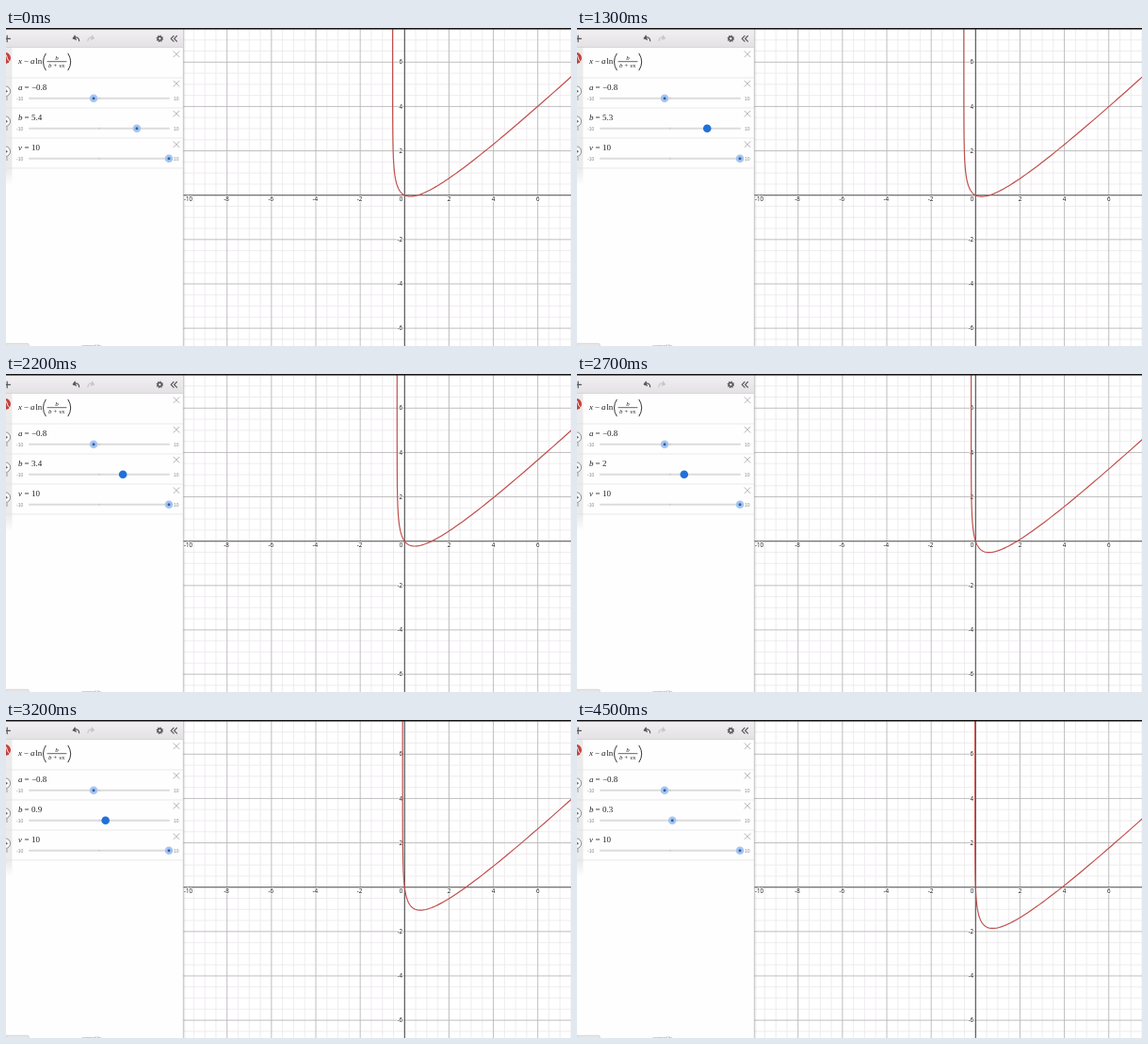
Write an HTML page that moves like this. It is 600 px wide and 338 px high and loops after 4.7 s.

```html
<!DOCTYPE html>
<html lang="en">
<head>
<meta charset="utf-8">
<title>Function plot with sliders</title>
<style>
  html, body { margin: 0; width: 100%; height: 100%; overflow: hidden; background: #fff; }
  svg { display: block; width: 600px; height: 338px; }
  .math { font-family: "Liberation Serif", "Times New Roman", serif; font-size: 9px; fill: #222; }
  .math .var, .var { font-style: italic; }
  .frac { font-size: 7px; }
  .limit { font: 5px "Liberation Sans", Arial, sans-serif; fill: #888; }
  .tick { font: 6.2px "Open Sans", "Noto Sans", sans-serif; fill: #111;
          stroke: #fff; stroke-width: 1.6px; paint-order: stroke; text-anchor: middle; }
  .line { fill: none; stroke-linecap: round; stroke-linejoin: round; }
  .halo { fill: #a6c5ef; }
  .dot { fill: #2b62b0; }
  .held .halo { fill: #2170d8; }
  .held .dot { fill: none; }
</style>
</head>
<body>
<svg viewBox="0 0 600 338">
  <defs>
    <linearGradient id="bar" x2="0" y2="1">
      <stop stop-color="#f3f1f3"/><stop offset="1" stop-color="#e3e1e3"/>
    </linearGradient>
    <linearGradient id="gutter" x2="0" y2="1">
      <stop offset=".88" stop-color="#ebebeb"/><stop offset="1" stop-color="#fff"/>
    </linearGradient>
    <linearGradient id="shade">
      <stop stop-color="#000" stop-opacity=".14"/><stop offset="1" stop-color="#000" stop-opacity="0"/>
    </linearGradient>
    <clipPath id="plot"><rect x="188" y="1" width="412" height="337"/></clipPath>
  </defs>

  <rect width="600" height="338" fill="#fff"/>
  <g clip-path="url(#plot)">
    <path id="minor" class="line" stroke="#ebe8eb" stroke-width=".8"/>
    <path id="major" class="line" stroke="#b9b7b9" stroke-width=".9"/>
    <path id="axes" class="line" stroke="#4a4a4a" stroke-width="1.1"/>
    <g id="ticks"></g>
    <path id="curve" class="line" stroke="#c0504d" stroke-width="1.2"/>
  </g>

  <rect width="188" height="338" fill="#fefefe"/>
  <rect x="188" width="3" height="338" fill="url(#shade)"/>
  <path d="M188.3 1V338" stroke="#c4c4c4" stroke-width=".7"/>
  <rect y="20" width="6.5" height="148" fill="url(#gutter)"/>
  <rect width="188" height="20.5" fill="url(#bar)"/>
  <path d="M0 20.5H188" stroke="#cfcdcf" stroke-width=".7"/>

  <g class="line" stroke="#555" stroke-width="1.2">
    <path d="M-2 11.3H4.5M1.2 8V14.6"/>
    <path d="M178 8.4l-2.8 2.9 2.8 2.9M181.4 8.4l-2.8 2.9 2.8 2.9"/>
    <path d="M72 10.5C75 9 77.5 10.5 77.7 13.7"/>
    <path d="M73.3 8.2L71.2 11l3.2 1.3" fill="#555"/>
    <g stroke="#c8c6c8">
      <path d="M92.6 10.5C89.6 9 87.1 10.5 86.9 13.7"/>
      <path d="M91.3 8.2l2.1 2.8-3.2 1.3" fill="#c8c6c8"/>
    </g>
    <circle cx="163.3" cy="11.3" r="2" stroke-width="1.5"/>
    <circle cx="163.3" cy="11.3" r="3.1" stroke-width="1.2" stroke-linecap="butt" stroke-dasharray="1.25 1.18"/>
  </g>

  <circle cx="-1" cy="32" r="6" fill="#c5403c"/>
  <path class="line" d="M0 28.5C1.5 30 1 34 3.5 35.5" stroke="#fff" stroke-width=".9"/>

  <g class="math">
    <text y="38.3"><tspan class="var" x="13">x</tspan><tspan x="18.8">−</tspan><tspan class="var" x="26">a</tspan><tspan x="31.2">ln</tspan></text>
    <g class="frac">
      <text class="var" x="52.3" y="33.6">b</text>
      <text y="42.2"><tspan class="var" x="45">b</tspan><tspan x="50.3">+</tspan><tspan class="var" x="56.2">vx</tspan></text>
    </g>
    <path class="line" stroke="#222" stroke-width=".7" d="M44 35.7H64"/>
    <path class="line" stroke="#222" stroke-width=".9" d="M42.2 27.2Q36.6 36 42.2 44.8M66 27.2Q71.6 36 66 44.8"/>
  </g>
  <g id="rows"></g>
  <g id="crosses" class="line" stroke="#b4b4b4" stroke-width="1"></g>

  <path d="M0 338V335.3H23Q24.5 335.3 24.5 338" fill="#e6e6e6" stroke="#c8c8c8" stroke-width=".6"/>
  <text x="80.5" y="339" class="limit" style="font-size:4px">powered by</text>
  <rect width="600" height="1.5" fill="#111"/>
</svg>

<script>
const LOOP = 4700, STEP = 100;
const UNIT = 23.57, X0 = 423.3, Y0 = 177.7;
const A = -0.8, V = 10;
// time in ms and the value of b there
const DRAG = [[1200, 5.4], [1300, 5.3], [1700, 4.7], [2200, 3.4], [2700, 2], [3200, 0.9], [3600, 0.3]];

const $ = id => document.getElementById(id);
const px = x => X0 + x * UNIT;
const py = y => Y0 - y * UNIT;
const vLine = x => `M${px(x)} 0V338`;
const hLine = y => `M188 ${py(y)}H600`;
const knobX = value => 25 + (value + 10) / 20 * 148;

function drawGrid() {
  let minor = '', major = '', ticks = '';
  const label = (x, y, n) => ticks += `<text class="tick" x="${x}" y="${y}">${n}</text>`;
  for (let i = -20; i <= 15; i++) {
    const n = i / 2;
    if (i % 4) minor += vLine(n) + hLine(n);
    else if (i) {
      major += vLine(n) + hLine(n);
      label(n === -10 ? 193.5 : px(n) - (n < 0 ? .7 : 0), 184.2, n);
      if (Math.abs(n) < 7) label(n < 0 ? 418.3 : 419.3, py(n) + 2.2, n);
    }
  }
  label(419.4, 184.2, 0);
  $('minor').setAttribute('d', minor);
  $('major').setAttribute('d', major);
  $('axes').setAttribute('d', vLine(0) + hLine(0));
  $('ticks').innerHTML = ticks;
}

function sliderRow(name, value, y) {
  return `
    <path d="M0 ${y + 10.2}H188" stroke="#dedede" stroke-width=".7"/>
    <circle cx="-.8" cy="${y - 7.6}" r="5.4" fill="#f8f8f8" stroke="#777" stroke-width=".8"/>
    <path d="M-1 ${y - 9.8}l3 2.2-3 2.2z" fill="#666"/>
    <path d="M0 ${y - .8}h2M0 ${y + 1.2}h2" stroke="#888" stroke-width=".8"/>
    <text class="math" y="${y - 8.8}"><tspan class="var" x="13">${name}</tspan><tspan x="19.6">=</tspan><tspan x="27" id="${name}Text">${String(value).replace('-', '−')}</tspan></text>
    <text class="limit" x="11" y="${y + 2.2}">-10</text>
    <text class="limit" x="178" y="${y + 2.2}">10</text>
    <path d="M25 ${y}H173" class="line" stroke="#dcdcdc" stroke-width="2"/>
    <path d="M99 ${y - 1}v2" stroke="#bbb" stroke-width=".6"/>
    <g id="${name}Knob" transform="translate(${knobX(value)} ${y})">
      <circle class="halo" r="4.3"/><circle class="dot" r="1.5"/>
    </g>`;
}

function valueAt(t) {
  if (t <= DRAG[0][0]) return DRAG[0][1];
  const i = DRAG.findIndex(key => key[0] >= t);
  if (i < 0) return DRAG[DRAG.length - 1][1];
  const [t0, b0] = DRAG[i - 1], [t1, b1] = DRAG[i];
  return Math.round((b0 + (b1 - b0) * (t - t0) / (t1 - t0)) * 10) / 10;
}

// Even steps in s = ln(1 + Vx/b) keep the steep branch smooth.
function curvePath(b) {
  const from = -11, to = Math.log(1 + V * 7.7 / b), count = 320;
  const points = [];
  for (let i = 0; i <= count; i++) {
    const s = from + (to - from) * i / count;
    const x = (Math.exp(s) - 1) * b / V;
    points.push(px(x).toFixed(2) + ' ' + py(x + A * s).toFixed(2));
  }
  return 'M' + points.join('L');
}

function frame(now) {
  const t = Math.floor(now % LOOP / STEP) * STEP;
  const b = valueAt(t);
  $('curve').setAttribute('d', curvePath(b));
  $('bText').textContent = b;
  $('bKnob').setAttribute('transform', `translate(${knobX(b)} 106.8)`);
  $('bKnob').setAttribute('class', t >= 1300 && t < 3700 ? 'held' : '');
  requestAnimationFrame(frame);
}

drawGrid();
$('rows').innerHTML = '<path d="M0 53H188" stroke="#dedede" stroke-width=".7"/>' +
  sliderRow('a', A, 74.8) + sliderRow('b', 5.4, 106.8) + sliderRow('v', V, 138.8);
$('crosses').innerHTML = [27.7, 59.2, 91.2, 123.7]
  .map(y => `<path d="M178 ${y - 3}l6 6m0-6l-6 6"/>`).join('');
frame(performance.now());
</script>
</body>
</html>
```
